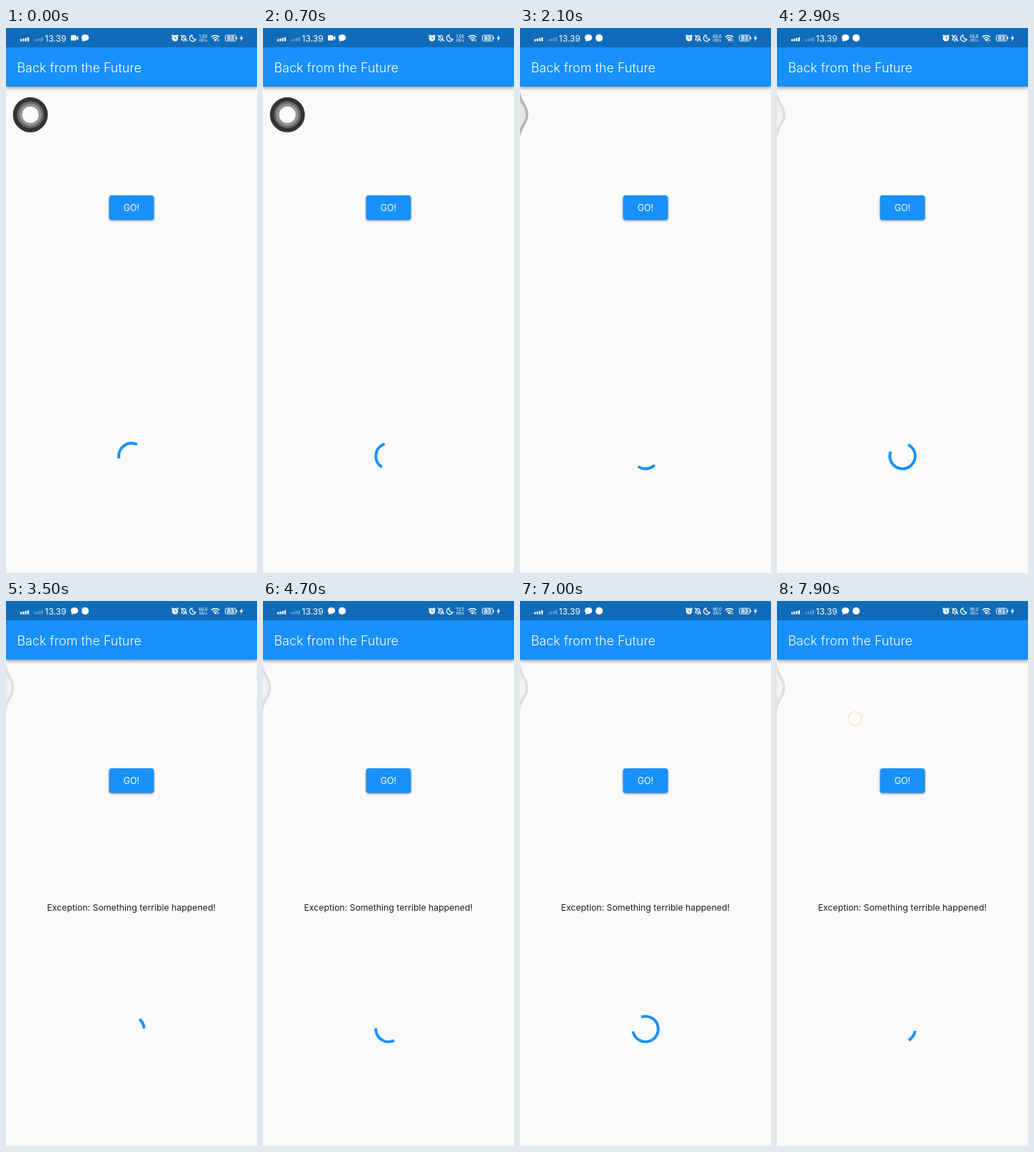
These frames come from a looping animation (352x762 px, 8000 ms). An HTML page:

```html
<!DOCTYPE html>
<html lang="en">
<head>
<meta charset="utf-8">
<title>Back from the Future</title>
<style>
  html, body { margin: 0; width: 100%; height: 100%; overflow: hidden; background: #fafafa; }
  svg { display: block; width: 352px; height: 762px; font-family: Inter, Roboto, sans-serif; }
  .shade { filter: drop-shadow(0 1.5px 1.8px rgba(0, 0, 0, .42)); }
  .line { fill: none; stroke: #fff; }
</style>
</head>
<body>
<svg viewBox="0 0 352 762">
  <defs>
    <clipPath id="buttonClip"><rect x="144.5" y="234" width="63" height="34.5" rx="3.8"/></clipPath>
  </defs>
  <rect width="352" height="762" fill="#fafafa"/>

  <g class="shade">
    <rect x="144.5" y="234" width="63" height="34.5" rx="3.8" fill="#1890fa"/>
  </g>
  <circle id="ripple" cx="180" cy="251" fill="#fff" clip-path="url(#buttonClip)"/>
  <text x="176" y="255.9" font-size="12.4" fill="#fff" text-anchor="middle">GO!</text>

  <text id="error" x="175.7" y="432.8" font-size="12.3" fill="#202020" text-anchor="middle">Exception: Something terrible happened!</text>
  <path id="spinner" fill="none" stroke="#1890fa" stroke-width="3.9" stroke-linecap="square"/>

  <path id="edgeTab" d="M-2 87C0 106 9.8 107 9.8 121S0 136 -2 155" stroke-width="3.8"/>
  <g id="ball">
    <circle r="24.5" fill="#333"/>
    <circle r="18.7" fill="#686868"/>
    <circle r="15.6" fill="#929292"/>
    <circle r="12.2" fill="#fafafa" stroke="#777" stroke-width=".8"/>
  </g>
  <circle id="touch" cx="109.5" cy="164.3" r="9.6" fill="#fdfbf8" stroke="#fbe3bd" stroke-width="1.5"/>

  <rect y="20" width="352" height="62" fill="#1890fa" style="filter: drop-shadow(0 2px 2.4px rgba(0,0,0,.4))"/>
  <rect width="352" height="27" fill="#106bb9"/>
  <text x="15.4" y="62" font-size="18" font-weight="300" fill="#fff">Back from the Future</text>

  <g fill="#fff">
    <path id="bars" d="M20 18.5v-3h2.2v3zM23.3 18.5v-3.8h2.2v3.8zM26.6 18.5v-4.6h2.2v4.6zM29.9 18.5v-5.4h2.2v5.4z"/>
    <use href="#bars" x="19.8" opacity=".35"/>
    <text x="54.6" y="18.6" font-size="12">13.39</text>
    <g id="camera"><rect x="91" y="10" width="7.4" height="7.6" rx="1.2"/><path d="M98.4 13l3-2v6l-3-2z"/></g>
    <g id="bubble"><ellipse cx="96" cy="13.4" rx="5.2" ry="4.5"/><path d="M92.4 15l-.6 4 4-1.6z"/></g>
    <circle id="badge" cx="111" cy="13.9" r="5.1"/>

    <circle cx="237" cy="14.2" r="4.3"/>
    <path class="line" d="M232.4 11.4l2-2M241.6 11.4l-2-2" stroke-width="1.4"/>
    <path d="M237 11.6v2.8l2 1.2" fill="none" stroke="#106bb9"/>
    <path class="line" d="M246 16.7h7l-1-1.7v-2.4a2.7 2.7 0 0 0-5.2 0v2.4zM248.5 18.5h2M245 9.6l9 9" stroke-width="1.1"/>
    <path class="line" d="M260.8 9.8a4.5 4.5 0 1 0 5.3 6a5 5 0 0 1-5.3-6z" stroke-width="1.3"/>
    <g text-anchor="middle">
      <text id="speed" x="276.5" y="13.6" font-size="6"></text>
      <text x="276.5" y="19" font-size="5">KB/s</text>
    </g>
    <path class="line" d="M288 12.6a8 8 0 0 1 11 0M290 15a5 5 0 0 1 7 0" stroke-width="1.5"/>
    <path d="M291.3 16.2a3.2 3.2 0 0 1 4.4 0l-2.2 2.5z"/>
    <path d="M296.4 18.6v-2.8M298.3 15.6v3" stroke="#fff" stroke-width=".8"/>
    <rect class="line" x="307.6" y="10.1" width="14.8" height="8" rx="2" stroke-width="1"/>
    <rect x="309.2" y="11.6" width="11.6" height="5" rx=".6" opacity=".3"/>
    <rect x="323" y="12.6" width="1.2" height="3" rx=".5"/>
    <text x="315" y="16.9" font-size="7.3" font-weight="600" text-anchor="middle">83</text>
    <path d="M331.2 9.7l-3.5 5h2.1l-.9 4 3.8-5.4h-2.2z"/>
  </g>
</svg>
<script>
const LOOP = 8000, STEP = 100, CYCLE = 1333;
const HELD = [1400, 5600];
const SPEEDS = [[0, "1,00"], [800, "66,6"], [3800, "13,5"], [6800, "90,0"]];
const $ = id => document.getElementById(id);
const clamp = x => Math.min(1, Math.max(0, x));
const ramp = (t, from, to) => clamp((t - from) / (to - from));
const mix = (a, b, k) => a + (b - a) * k;
const gray = v => `rgb(${v},${v},${v})`;
const set = (id, attrs) => {
  for (const name in attrs) $(id).setAttribute(name, attrs[name]);
};
const show = (id, on) => set(id, { visibility: on ? "visible" : "hidden" });

// cubic-bezier(.4, 0, .2, 1)
function fastOutSlowIn(x) {
  let lo = 0, hi = 1;
  for (let i = 0; i < 24; i++) {
    const s = (lo + hi) / 2, r = 1 - s;
    if (1.2 * r * r * s + .6 * r * s * s + s ** 3 < x) lo = s; else hi = s;
  }
  return 3 * lo * lo - 2 * lo ** 3;
}

function drawSpinner(t) {
  const time = t + 214 + t * .003;
  const phase = time / CYCLE % 1, turns = Math.floor(time / CYCLE);
  const head = 270 * fastOutSlowIn(clamp(phase * 2));
  const tail = 270 * fastOutSlowIn(clamp(phase * 2 - 1));
  const base = 216 * (turns + 1) + 306 * phase;
  const sweep = Math.max(head - tail, .1);
  const point = deg => {
    const a = deg * Math.PI / 180;
    return `${176 + 17.8 * Math.sin(a)} ${598.5 - 17.8 * Math.cos(a)}`;
  };
  set("spinner", {
    d: `M${point(base + tail)}A17.8 17.8 0 ${+(sweep > 180)} 1 ${point(base + tail + sweep)}`
  });
}

function drawRipple(t) {
  const start = t < 4000 ? 1300 : 5500;
  const age = t - start;
  set("ripple", {
    r: age < 0 ? 0 : mix(8, 48, ramp(age, 0, 200)),
    opacity: age < 0 ? 0 : .14 * (1 - ramp(age, 250, 700))
  });
}

function drawBall(t) {
  const slide = fastOutSlowIn(ramp(t, 1600, 2000));
  set("ball", {
    transform: `translate(${mix(34.2, -18, slide)} 121.3)`,
    opacity: 1 - ramp(t, 1800, 2050)
  });
  const fade = ramp(t, 2200, 2700);
  set("edgeTab", {
    opacity: ramp(t, 1850, 2050),
    stroke: gray(mix(182, 222, fade)),
    fill: gray(mix(228, 241, fade))
  });
}

function render(ms) {
  let t = Math.floor(ms % LOOP / STEP) * STEP;
  if (HELD.includes(t)) t -= STEP;
  const updated = t >= 800;
  drawSpinner(t);
  drawRipple(t);
  drawBall(t);
  show("camera", !updated);
  show("badge", updated);
  set("bubble", { transform: `translate(${updated ? 0 : 15} 0)` });
  $("speed").textContent = SPEEDS.filter(([at]) => at <= t).pop()[1];
  show("error", t >= 3400);
  show("touch", t >= 7800);
}

const began = performance.now();
function tick() {
  render(performance.now() - began);
  requestAnimationFrame(tick);
}
tick();
</script>
</body>
</html>
```
